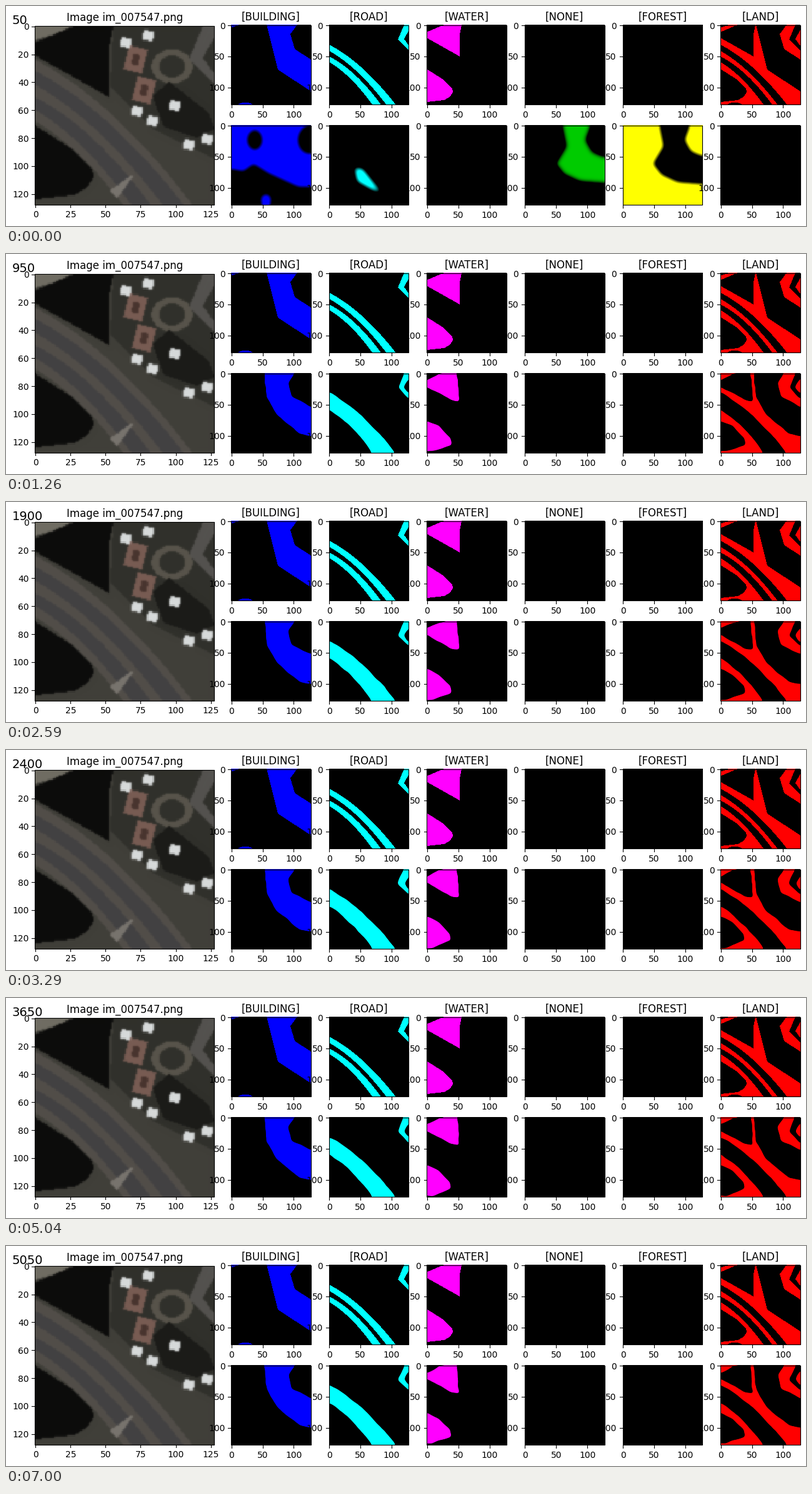
These frames come from a looping animation (1280x353 px, 7070 ms). A matplotlib script:

```python
import numpy as np
import matplotlib.pyplot as plt
from matplotlib.animation import FuncAnimation
from matplotlib.path import Path
from matplotlib.patches import Rectangle

W, H, N = 1280, 353, 128
FRAMES, STEP = 101, 70
WARMUP = 10  # frames until the network has found the right classes
NAMES = ["BUILDING", "ROAD", "WATER", "NONE", "FOREST", "LAND"]
COLORS = np.array([(0, 0, 1), (0, 1, 1), (1, 0, 1), (0, 1, 0), (1, 1, 0), (1, 0, 0)])
BUILDING, ROAD, WATER, NONE, FOREST, LAND = range(6)

grid = np.arange(N) + 0.5
X, Y = np.meshgrid(grid, grid)


def poly(*flat):
    path = Path(np.reshape(flat, (-1, 2)))
    return path.contains_points(np.c_[X.ravel(), Y.ravel()]).reshape(N, N)


def oval(x, y, rx, ry):
    return np.hypot((X - x) / rx, (Y - y) / ry) < 1


def below(y0, slope, bend):
    return Y > y0 + slope * X + bend * X**2


def blur_matrix(sigma):
    g = np.exp(-0.5 * ((grid[:, None] - grid) / sigma) ** 2)
    return g / g.sum(1, keepdims=True)


def blur(mask, g):
    return g @ mask @ g.T


# ---- true classes: two curved lanes, a bent road, a building block, two lakes
edges = [below(32, 0.52, 0.0036), below(42, 0.56, 0.0042),
         below(51, 0.50, 0.0052), below(60, 0.58, 0.0059)]
lanes = (edges[0] & ~edges[1]) | (edges[2] & ~edges[3])
chevron = poly(120, 0, 128, 0, 128, 8, 120, 23, 128, 34, 128, 41, 110, 24)
strips = poly(0, 0, 13, 0, 0, 5) | (oval(23, 129, 12, 4))

truth = np.zeros((6, N, N))
truth[BUILDING] = strips | poly(57, 0, 106, 0, 95, 15, 102, 39, 128, 56, 128, 107, 75, 72)
truth[ROAD] = lanes | chevron
truth[WATER] = (poly(0, 12, 28, 0, 56, 0, 53, 15, 53, 51, 0, 21)
                | poly(0, 71, 25, 87, 41, 102, 42, 108, 38, 115, 28, 121, 0, 124))
truth[LAND] = 1 - truth[:3].max(0)

# ---- what the network sees at first, and what it settles on
soft, fine, rough = blur_matrix(4), blur_matrix(2.2), blur_matrix(6)

early = np.zeros((5, N, N))
tongue = poly(58, 0, 108, 0, 99, 24, 109, 42, 128, 50, 128, 95, 88, 92, 62, 80, 48, 62, 65, 34)
early[BUILDING] = (poly(0, 0, 128, 0, 128, 99, 108, 99, 60, 77, 36, 62, 20, 74, 0, 70)
                   & ~oval(38, 24, 12, 16) & ~oval(125, 24, 18, 22)) | oval(56, 120, 8, 9)
early[ROAD] = poly(41, 69, 53, 70, 83, 108, 70, 104, 45, 90)
early[NONE] = tongue
early[FOREST] = ~tongue
early = np.array([blur(m, soft) for m in early])
early[NONE] -= 0.35

late = np.zeros((5, N, N))
late[BUILDING] = poly(54, 0, 103, 0, 92, 16, 97, 38, 128, 54, 128, 101, 110, 97, 73, 67, 57, 38)
late[ROAD] = (edges[0] & ~edges[3]) | chevron
late[WATER] = (poly(0, 12, 20, 2, 49, 0, 52, 46, 40, 44, 0, 22)
               | poly(0, 76, 18, 85, 38, 104, 39, 115, 10, 126, 0, 126))
late = np.array([blur(m, fine) for m in late])


def predict(i):
    s = 1 - (1 - min(i / WARMUP, 1)) ** 2
    field = (1 - s) * early + s * late
    rng = np.random.default_rng(i)
    for kind in (BUILDING, ROAD, WATER):
        wobble = blur(rng.normal(size=(N, N)), rough)
        field[kind] += 0.08 * s * wobble / wobble.std()
    out = np.zeros((6, N, N))
    out[:5] = np.clip((field - 0.5) * (2 + 5 * s) + 0.5, 0, 1)
    out[LAND] = (1 - out[:5].max(0)) * min(1, 2 * s)
    return out


def aerial():
    """Flat stand-in for the aerial photo."""
    img = np.full((N, N, 3), (64, 63, 57), float)

    def paint(color, mask):
        img[mask] = color

    def block(color, x, y, w, h):
        # rectangle leaning like the houses in the scene
        u, v = X - x + 0.25 * (Y - y), Y - y - 0.25 * (X - x)
        paint(color, (abs(u) < w / 2) & (abs(v) < h / 2))

    paint((112, 109, 99), poly(0, 0, 36, 0, 0, 10))
    paint((82, 78, 73), below(24, 0.52, 0.0036) & ~below(68, 0.58, 0.0059))
    paint((66, 65, 66), lanes)
    paint((48, 48, 43), poly(56, 0, 128, 0, 128, 95, 85, 74, 54, 44))
    paint((88, 84, 75), abs(np.hypot((X - 98) / 12, (Y - 29) / 10) - 1) < 0.22)
    paint((84, 82, 79), chevron)
    paint((27, 27, 24), poly(84, 50, 96, 40, 124, 62, 128, 74, 116, 80, 92, 72))
    paint((12, 12, 11), truth[WATER] > 0)
    for x, y in [(72, 24), (78, 46)]:
        block((120, 92, 83), x, y, 14, 18)
        block((72, 52, 46), x, y, 5, 8)
    for x, y in [(65, 12), (81, 7), (73, 61), (84, 68), (100, 57), (110, 85), (123, 81)]:
        block((215, 218, 218), x, y, 8, 7)
    paint((120, 116, 110), poly(53, 118, 69, 107, 70, 108, 59, 123))
    g = blur_matrix(0.6)
    return np.stack([blur(img[..., c], g) for c in range(3)], -1) / 255


# ---- stage, in pixels
fig = plt.figure(figsize=(W / 100, H / 100), dpi=100, facecolor="white")
ax = fig.add_axes([0, 0, 1, 1])
TICK, GAP, PAD = 4.86, 9.72, 8.33


def panel(z, x, y, size, image, xstep, ystep, title=None):
    """One framed image with ticks; panels with higher z cover the others."""
    pic = ax.imshow(image, extent=(x, x + size, y + size, y), vmin=0, vmax=1, aspect="auto",
                    interpolation="nearest", zorder=z)
    line = dict(color="black", lw=0.8, zorder=z + 0.5)
    font = dict(fontsize=10, zorder=z + 0.5)
    ax.add_patch(Rectangle((x, y), size, size, fill=False, **line))
    end = y + size
    for v in range(0, N, xstep):
        p = x + (v + 0.5) * size / N
        ax.plot([p, p], [end, end + TICK], **line)
        ax.text(p, end + GAP, v, ha="center", va="top", **font)
    for v in range(0, N, ystep):
        p = y + (v + 0.5) * size / N
        ax.plot([x - TICK, x], [p, p], **line)
        ax.text(x - GAP, p, v, ha="right", va="center_baseline", **font)
    if title:
        ax.text(x + size / 2, y - PAD, title, ha="center", fontsize=12, zorder=z + 0.5)
    return pic


def tint(mask, kind):
    return mask[..., None] * COLORS[kind]


panel(1, 46.2, 31.6, 287, aerial(), 25, 20, "Image im_007547.png")
pics = []
for kind, (name, mask) in enumerate(zip(NAMES, predict(0))):
    x = 360.2 + 156.6 * kind
    panel(2 + 2 * kind, x, 30.6, 127.6, tint(truth[kind], kind), 50, 50, f"[{name}]")
    pics.append(panel(3 + 2 * kind, x, 191.6, 127.6, tint(mask, kind), 50, 50))

counter = ax.text(9.5, 29, "50", fontsize=14, zorder=99)
ax.set_xlim(0, W)
ax.set_ylim(H, 0)
ax.axis("off")


def update(i):
    for kind, mask in enumerate(predict(i)):
        pics[kind].set_data(tint(mask, kind))
    counter.set_text(str(50 * (i + 1)))
    return [*pics, counter]


anim = FuncAnimation(fig, update, frames=FRAMES, interval=STEP, repeat=True, repeat_delay=0)
plt.show()
```
